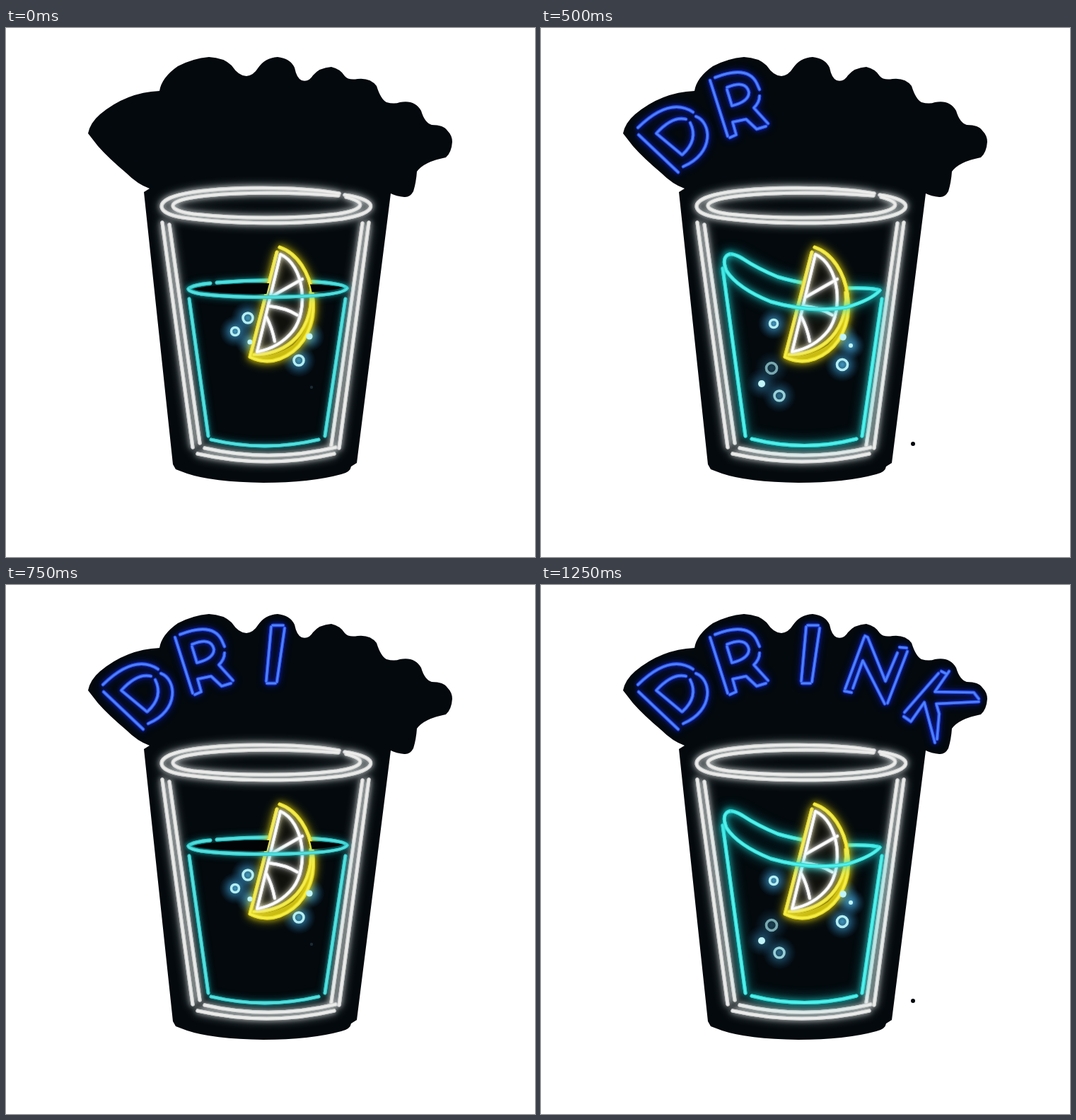
Animation of 748 by 748 pixels, one loop 1500 ms. Source, as an HTML page with a canvas:

```html
<!DOCTYPE html>
<html lang="en">
<head>
<meta charset="utf-8">
<title>Neon drink sign</title>
<style>
  html, body { margin: 0; width: 100%; height: 100%; overflow: hidden; background: #fff; }
  canvas { display: block; width: 748px; height: 748px; }
</style>
</head>
<body>
<canvas id="sign" width="748" height="748"></canvas>
<script>
const ctx = document.getElementById('sign').getContext('2d');
const STEP = 250;
const STEPS = 6;
const DARK = '#03090d';

const WHITE = { tube: '#d0d2d1', core: '#ececeb', glow: 'rgba(225,232,230,.72)', blur: 14, width: 5.2 };
const CYAN = { tube: '#2fdcda', core: '#58f0ea', glow: 'rgba(35,215,215,.85)', blur: 17, width: 5 };
const CALM = { tube: '#35cccd', core: '#58e0de', glow: 'rgba(35,190,195,.6)', blur: 11, width: 4.8 };
const YELLOW = { tube: '#e4da22', core: '#f6ee4a', glow: 'rgba(235,215,20,.85)', blur: 16, width: 5 };
const FLESH = { tube: '#e4e4e4', core: '#ffffff', glow: 'rgba(225,225,225,.75)', blur: 11, width: 4.4 };
const BLUE = { tube: '#2b50e6', core: '#5083fb', glow: 'rgba(18,34,215,.72)', blur: 11, width: 4.6 };

const board = new Path2D(
  'M116 149Q119 134 133 122Q170 91 217 89Q220 70 243 54Q264 43 287 41Q308 42 319 53Q329 68 340 68' +
  'Q350 67 356 57Q366 42 384 41Q402 43 408 56Q411 71 418 74Q428 77 434 67Q443 56 460 55Q473 58 479 68' +
  'Q484 74 497 72Q515 70 524 82Q530 101 538 105Q549 108 557 105Q578 101 587 117Q592 134 602 137' +
  'Q619 137 624 145Q631 152 631 161Q630 176 622 183Q591 189 581 203Q580 218 576 231Q571 240 563 239' +
  'Q552 238 544 234L496 615L488 620Q487 628 474 631Q430 643 364 643Q292 642 256 630L240 624L236 617' +
  'L195 232L203 227Q186 221 170 205Q145 184 130 167Z');

const glass = [
  'M471 234C400 222 290 225 245 236C210 245 212 262 250 268C320 278 415 278 475 270C525 262 532 244 479 236',
  'M470 237C400 231 310 232 262 240C226 246 228 258 265 263C330 270 410 270 468 263C508 257 510 246 481 239',
  'M221 275L264 593', 'M231 278L274 587',
  'M513 275L471 594', 'M504 276L460 590',
  'M281 594Q373 615 466 593', 'M271 602Q370 624 464 602'
];

// Liquid poses: level, high on the right, high on the left
const poses = [
  {
    style: CALM,
    hollow: 'M264 369Q300 361 370 361Q440 361 477 367Q450 375 370 376Q290 376 264 369Z',
    back: ['M258 369Q264 363 289 361', 'M298 360Q370 354 440 359Q480 362 482 368'],
    front: ['M482 368Q477 378 400 380Q325 382 275 376Q258 373 258 369'],
    walls: ['M259 383L286 577', 'M480 383L451 577', 'M290 582Q366 600 442 582'],
    lift: 0,
    rings: [[342, 410, 7], [324, 429, 5.5], [414, 470, 7]],
    dots: [[345, 444, 3.6], [429, 436, 4.6]]
  },
  {
    style: CYAN,
    hollow: 'M437 358Q450 340 467 333Q466 346 452 354Z',
    back: ['M263 370Q320 368 372 358Q425 348 452 327Q468 316 476 320'],
    front: ['M474 319Q485 324 476 345Q458 370 415 387Q370 402 315 395Q282 387 262 373'],
    walls: ['M257 383L286 576', 'M482 340L451 577', 'M294 581Q368 600 441 582'],
    lift: 25.5,
    rings: [[328, 424, 5.5], [338, 495, 6.5], [437, 485, 5.5]],
    dots: [[312, 443, 4], [420, 505, 4]]
  },
  {
    style: CYAN,
    back: ['M479 371Q468 367 432 368Q375 364 335 352Q306 340 285 326Q270 317 264 321'],
    front: ['M266 320Q255 324 262 343Q278 368 325 387Q380 403 432 395Q468 384 479 371'],
    walls: ['M257 340L289 577', 'M482 383L454 577', 'M298 581Q373 600 446 581'],
    lift: 0,
    rings: [[329, 418, 5.5], [326, 481, 7.5, .4], [337, 520, 7, .7], [426, 476, 7.5]],
    dots: [[312, 503, 5, .6], [427, 437, 4.8], [438, 449, 3]],
    speck: [526, 588, 3]
  }
];

const lemon = {
  body: 'M386 310C438 328 453 420 406 457Q376 480 345 465L384 316Z',
  rind: 'M431 372C436 402 425 430 406 448Q380 466 345 465Q376 480 406 457C440 432 442 395 431 372Z',
  peel: [
    'M387 310C438 328 453 420 406 457Q376 480 345 465L383 317',
    'M431 374C434 402 422 429 404 444Q382 462 350 462'
  ],
  flesh: [
    'M388 320C422 335 428 399 406 428Q387 452 355 458Z',
    'M375 380L419 355', 'M371 393Q397 396 412 406', 'M368 408Q376 423 380 443'
  ]
};

const letters = [
  ['M138 151L194 204', 'M137 141Q182 97 215 119', 'M219 125C241 133 246 177 201 196',
   'M199 179L163 149Q186 124 205 129', 'M211 134Q223 158 200 179'],
  ['M239 74L264 153', 'M246 70Q292 52 305 78L309 87', 'M309 96Q309 105 301 113L321 135',
   'M318 139L305 143L290 129L271 133L276 151L267 155', 'M263 84Q290 73 294 91Q294 104 270 110L263 87'],
  ['M375 59L368 136', 'M377 57L392 57', 'M394 61L383 137', 'M369 139L381 139'],
  ['M457 74L430 147', 'M429 150L439 152', 'M441 146L455 107L486 168', 'M490 167L518 94',
   'M517 89L507 88', 'M504 96L487 136L462 74L458 72'],
  ['M562 125L514 180', 'M513 186L523 193L542 166L557 223', 'M560 218L563 182L559 168L619 165',
   'M619 161L612 152L557 151L577 122', 'M566 122L574 126']
];

function fill(d, color) {
  ctx.fillStyle = color;
  ctx.fill(new Path2D(d));
}

function neon(lines, style) {
  const path = new Path2D();
  lines.forEach(d => path.addPath(new Path2D(d)));
  ctx.save();
  ctx.lineCap = ctx.lineJoin = 'round';
  ctx.shadowColor = style.glow;
  ctx.strokeStyle = style.tube;
  ctx.lineWidth = style.width;
  for (const blur of [style.blur, style.blur * .5]) {
    ctx.shadowBlur = blur;
    ctx.stroke(path);
  }
  ctx.shadowBlur = 0;
  ctx.strokeStyle = style.core;
  ctx.lineWidth = style.width * .55;
  ctx.stroke(path);
  ctx.restore();
}

function disc(x, y, r, color) {
  ctx.fillStyle = color;
  ctx.beginPath();
  ctx.arc(x, y, r, 0, Math.PI * 2);
  ctx.fill();
}

function halo(x, y, r, strength = 1) {
  const size = r + 17;
  const g = ctx.createRadialGradient(x, y, 0, x, y, size);
  g.addColorStop(0, `rgba(75,175,220,${.85 * strength})`);
  g.addColorStop(.45, `rgba(50,130,175,${.55 * strength})`);
  g.addColorStop(1, 'rgba(25,80,120,0)');
  disc(x, y, size, g);
}

function bubbles({ rings, dots }) {
  for (const [x, y, r, strength = 1] of rings) {
    ctx.globalAlpha = .4 + .6 * strength;
    ctx.strokeStyle = '#b4eef3';
    ctx.lineWidth = 3.6;
    ctx.beginPath();
    ctx.arc(x, y, r, 0, Math.PI * 2);
    ctx.stroke();
    ctx.globalAlpha = 1;
  }
  for (const [x, y, r] of dots) disc(x, y, r, '#c2f5f8');
}

function slice(lift) {
  ctx.save();
  ctx.translate(0, lift);
  fill(lemon.body, '#10110d');
  fill(lemon.rind, '#a29a12');
  neon(lemon.peel, YELLOW);
  neon(lemon.flesh, FLESH);
  ctx.restore();
}

function draw(step) {
  const pose = poses[step % poses.length];
  ctx.fillStyle = '#fff';
  ctx.fillRect(0, 0, 748, 748);
  ctx.fillStyle = DARK;
  ctx.fill(board);

  ctx.save();
  ctx.clip(board);
  neon(glass, WHITE);
  neon(pose.walls, pose.style);
  neon(pose.back, pose.style);
  [...pose.rings, ...pose.dots].forEach(b => halo(...b));
  if (pose.style === CALM) disc(432, 508, 2.2, '#1c2a31');
  slice(pose.lift);
  neon(pose.front, pose.style);
  if (pose.hollow) {
    ctx.globalCompositeOperation = 'darken';
    ctx.save();
    // The dark opening stays beside the slice
    const beside = new Path2D('M0 0H748V748H0Z');
    beside.addPath(new Path2D(lemon.body), new DOMMatrix([1, 0, 0, 1, 0, pose.lift]));
    ctx.clip(beside, 'evenodd');
    fill(pose.hollow, '#010304');
    ctx.restore();
    ctx.globalCompositeOperation = 'source-over';
  }
  bubbles(pose);
  letters.slice(0, step).forEach(lines => neon(lines, BLUE));
  ctx.restore();

  if (pose.speck) disc(...pose.speck, DARK);
}

let shown = -1;
function tick(now) {
  const step = Math.floor(now / STEP) % STEPS;
  if (step !== shown) draw(shown = step);
  requestAnimationFrame(tick);
}
draw(shown = 0);
requestAnimationFrame(tick);
</script>
</body>
</html>
```
